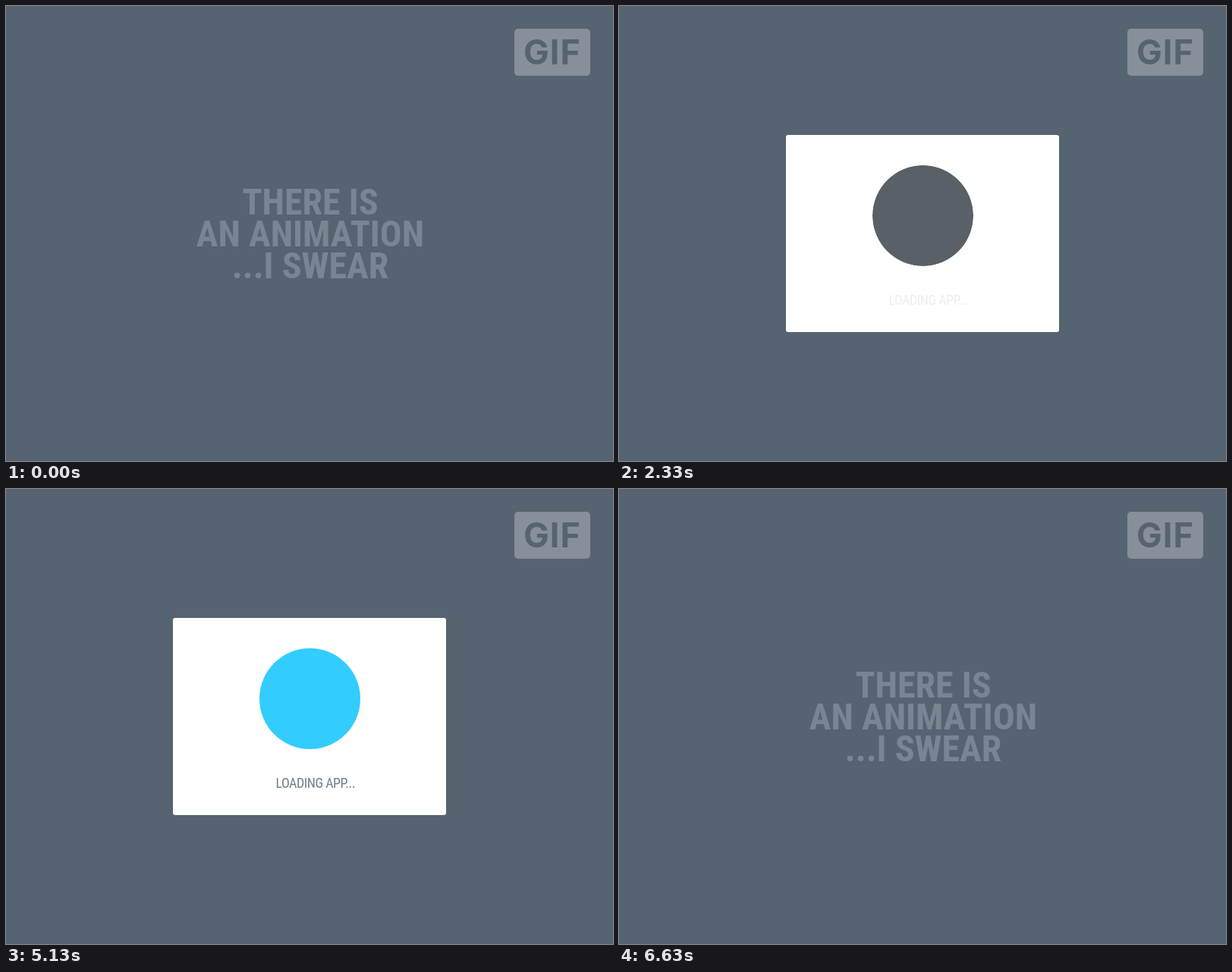
An HTML page that plays this animation: 800 px wide and 600 px high, repeating every 6830 ms.

```html
<!DOCTYPE html>
<html lang="en">
<head>
<meta charset="utf-8">
<title>Loading animation</title>
<style>
  html, body { margin: 0; width: 100%; height: 100%; overflow: hidden; background: #566370; }
  svg { display: block; width: 800px; height: 600px; }
  text { font-family: "Roboto Condensed", Roboto, sans-serif; font-stretch: 75%; }
  .title, .card, .content, .disc, .label, .wave { animation: 6830ms linear infinite; }

  .title { font-size: 48px; font-weight: 700; fill: #788694; text-anchor: middle; animation-name: title; }
  .card { fill: #fff; animation-name: card; }
  .content { animation-name: content; }
  .disc { animation-name: disc; }
  .label { font-size: 18px; fill: #6f7f8c; letter-spacing: -.5px; animation-name: label; }
  .wave { fill: #3cf; animation-name: wave; }
  .badge text { font: 700 45px Inter, sans-serif; letter-spacing: 1px; fill: #566370; }

  /* percentages are ms / 68.3 */
  @keyframes title {
    0%, 18.87% { opacity: 1; }
    18.88%, 23.12% { opacity: .38; }
    23.13%, 90.78% { opacity: 0; }
    97.07%, 100% { opacity: 1; }
  }
  @keyframes card {
    0%, 23.28% { opacity: 0; }
    29.58%, 90.78% { opacity: 1; }
    97.07%, 100% { opacity: 0; }
  }
  @keyframes disc {
    0%, 28.84% { opacity: 0; }
    34.99%, 100% { opacity: 1; }
  }
  @keyframes label {
    0%, 33.24% { opacity: 0; }
    39.39%, 100% { opacity: 1; }
  }
  @keyframes wave {
    0%, 41.26% { transform: none; animation-timing-function: steps(79, end); }
    75.96%, 100% { transform: translate(-794px, -154.6px); }
  }
  @keyframes content {
    0%, 80.09% { opacity: 1; transform: none; }
    86.24%, 100% { opacity: 0; transform: translateY(22px); }
  }
</style>
</head>
<body>
<svg viewBox="0 0 800 600">
  <clipPath id="round"><circle cx="400.5" cy="276.5" r="66.5"/></clipPath>

  <g class="badge">
    <rect x="670" y="30" width="100" height="62" rx="5" fill="#878f9a"/>
    <text x="682" y="77">GIF</text>
  </g>

  <g class="title">
    <text x="401" y="275">THERE IS</text>
    <text x="401" y="317">AN ANIMATION</text>
    <text x="401" y="359">...I SWEAR</text>
  </g>

  <rect class="card" x="220" y="170" width="360" height="260" rx="3"/>

  <g class="content">
    <g class="disc" clip-path="url(#round)">
      <circle cx="400.5" cy="276.5" r="66.5" fill="#3e464e"/>
      <path class="wave" id="wave"/>
    </g>
    <text class="label" x="355.5" y="394">LOADING APP...</text>
  </g>
</svg>
<script>
  // five periods of a 266px wave, 20px high, closed far below
  const period = "c66.5 0 66.5-20 133-20s66.5 20 133 20";
  document.getElementById("wave").setAttribute("d", "M8.9 364" + period.repeat(5) + "v300h-1330z");
</script>
</body>
</html>
```
